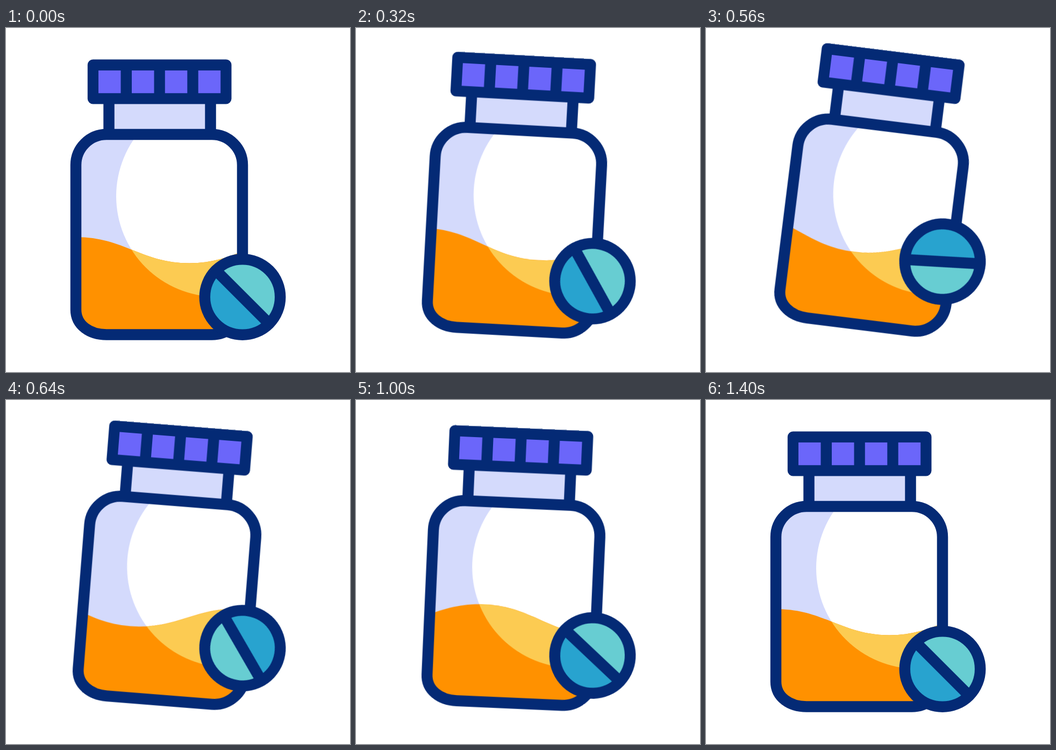
These frames come from a looping animation (640 px wide and 640 px high, 2 s). An HTML page:

```html
<!DOCTYPE html>
<html lang="en">
<head>
<meta charset="utf-8">
<title>Medicine bottle</title>
<style>
  html, body { margin: 0; height: 100%; overflow: hidden; background: #fff; }
  svg { display: block; width: 100vw; height: 100vh; }

  .line { fill: none; stroke: #042a75; stroke-width: 20.5; }
  .navy { fill: #042a75; }
  .glass { fill: #d4dafc; }
  .shine { fill: #fff; }
  .deep { fill: #ff9100; }
  .light { fill: #fccb52; }
  .key { fill: #6b66fa; }
  .teal { fill: #67cdd2; }
  .blue { fill: #28a3cf; }

  .bottle, .wave, .hop, .spin {
    animation: 2s cubic-bezier(.4, 0, .6, 1) infinite;
  }
  .bottle { transform-origin: 438px 567px; animation-name: tilt; }
  .wave { animation-name: flow; }
  .hop { animation-name: hop; }
  .spin { transform-origin: 440px 500.5px; animation-name: spin; }

  @keyframes tilt {
    0%, 10% { transform: rotate(0deg); }
    24% { transform: rotate(8deg); }
    42% { transform: rotate(-.4deg); }
    53% { transform: rotate(3.05deg); }
    66%, 100% { transform: rotate(0deg); }
  }
  @keyframes flow {
    0%, 10% { transform: translateX(0); }
    70%, 100% { transform: translateX(-420px); }
  }
  @keyframes hop {
    0%, 10% { transform: translateY(0); }
    24% { transform: translateY(-76px); }
    40% { transform: translateY(-2.5px); }
    52% { transform: translateY(-26.5px); }
    66%, 100% { transform: translateY(0); }
  }
  @keyframes spin {
    0%, 10% { transform: rotate(0deg); }
    52%, 100% { transform: rotate(360deg); }
  }
</style>
</head>
<body>
<svg viewBox="0 0 640 640">
  <defs>
    <path id="body" d="M187 198H383a57 57 0 0 1 57 57V513.5a57 57 0 0 1 -57 57H187C156 570.5 130 553 130 524V255a57 57 0 0 1 57 -57Z"/>
    <path id="liquid" d="M131 389c88 0 122 48.5 210 48.5s122 -48.5 210 -48.5s122 48.5 210 48.5s122 -48.5 210 -48.5V600H131Z"/>
    <circle id="disc" cx="392" cy="313" r="187"/>
    <clipPath id="inside"><use href="#body"/></clipPath>
    <clipPath id="lit"><use href="#disc"/></clipPath>
  </defs>

  <g class="bottle">
    <path class="glass" d="M192 132H380V198H192Z"/>
    <path class="line" d="M191.5 132V198M380.5 132V198"/>
    <g clip-path="url(#inside)">
      <use class="glass" href="#body"/>
      <use class="shine" href="#disc"/>
      <use class="deep wave" href="#liquid"/>
      <g clip-path="url(#lit)">
        <use class="light wave" href="#liquid"/>
      </g>
    </g>
    <use class="line" href="#body"/>
    <rect class="navy" x="151.8" y="58.5" width="267.7" height="83" rx="10"/>
    <path class="key" d="M172 79h41.5v42.2h-41.5zM234 79h41.5v42.2h-41.5zM295.8 79h41.5v42.2h-41.5zM357.7 79h41.5v42.2h-41.5z"/>
  </g>

  <g class="hop">
    <g class="spin">
      <circle class="blue" cx="440" cy="500.5" r="70"/>
      <path class="teal" d="M390.5 451a70 70 0 0 1 99 99Z"/>
      <path class="line" d="M390.5 451l99 99"/>
      <circle class="line" cx="440" cy="500.5" r="70.2"/>
    </g>
  </g>
</svg>
</body>
</html>
```
